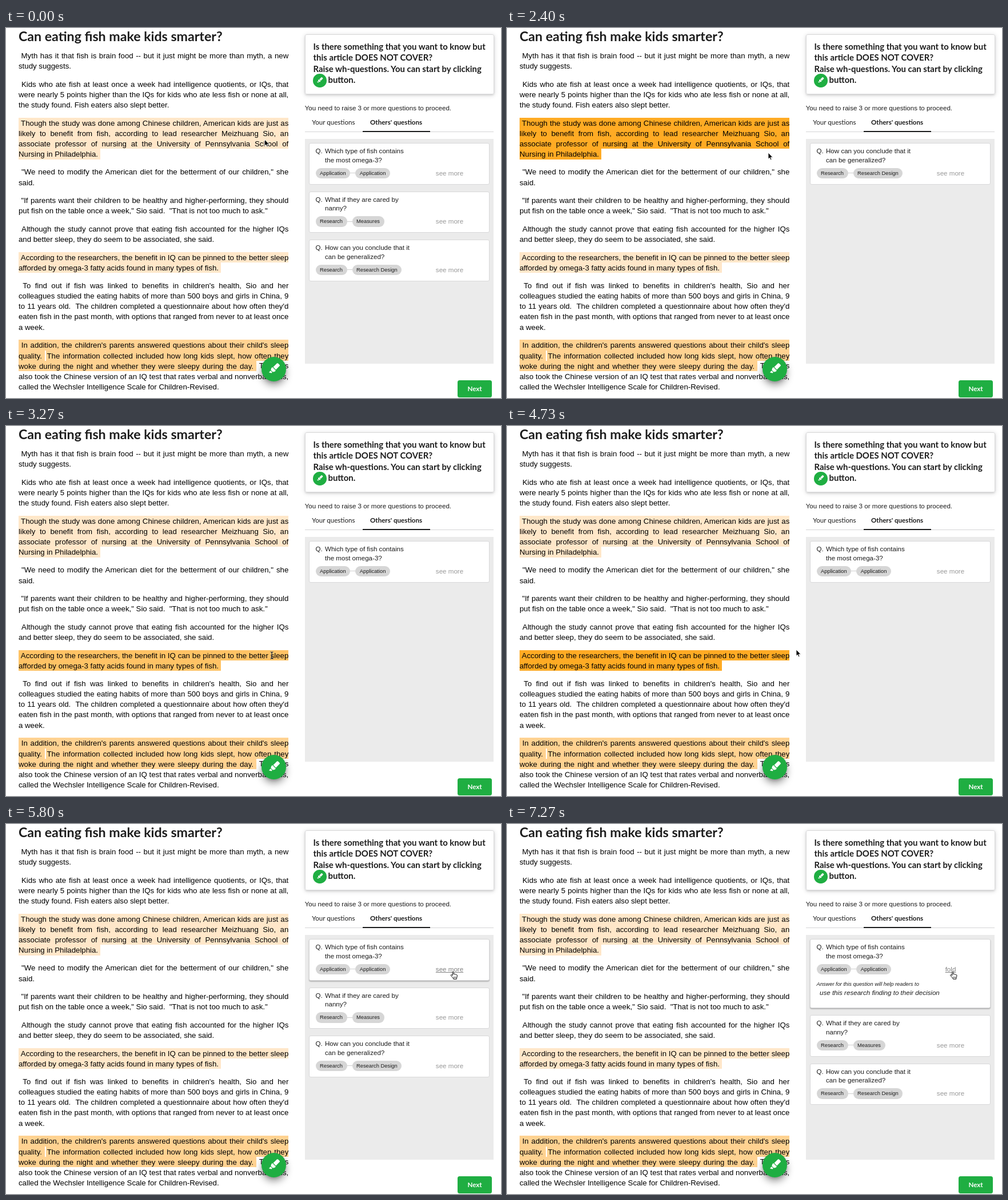
An HTML page that plays this animation: 866 px wide and 647 px high, repeating every 7.47 s.

```html
<!DOCTYPE html>
<html lang="en">
<head>
<meta charset="utf-8">
<title>Reading exercise</title>
<style>
  html, body { margin: 0; width: 100%; height: 100%; overflow: hidden; background: #fff; }
  body { position: relative; font: 11.58px "Liberation Sans", Arial, sans-serif; color: #1c1c1c; }
  body > *, .card > * { position: absolute; box-sizing: border-box; white-space: nowrap; }
  h1 { left: 22px; top: -1px; margin: 0; font: bold 23.17px/30px Lato, sans-serif; }

  #article { left: 22px; top: 40px; width: 472.3px; font-size: 13.24px; line-height: 18.2px; color: #000; }
  #article section { margin-bottom: 13.24px; }
  #article div { height: 18.2px; text-align: justify; text-align-last: justify; }
  #article div:last-child { text-align-last: left; }
  mark { padding: 1.6px 0; color: inherit; background: var(--tint, #ffd291); }
  mark + mark { margin-left: 2px; padding-left: 1.5px; }

  .round { border-radius: 50%; background: #1fae42; }
  .round svg { display: block; width: 100%; height: 100%; fill: #fff; }
  #fab { left: 447px; top: 574.5px; width: 43px; height: 43px; box-shadow: 0 7px 13px rgba(0,0,0,.38), 0 2px 4px rgba(0,0,0,.15); }
  #small { left: 537.3px; top: 80.3px; width: 23.4px; height: 23.4px; }

  #prompt { left: 522.5px; top: 11px; width: 331px; height: 104.5px; padding: 11.3px 14px; border: 1px solid #d9d9da; border-radius: 3px;
    box-shadow: 0 1.6px 3.3px rgba(34,36,38,.14), 0 1.6px 8px rgba(34,36,38,.15); font: bold 14.9px/19.15px Lato, sans-serif; }
  #prompt span { margin-left: 26px; }
  #need { left: 522.7px; top: 133px; line-height: 15px; }
  .tab { top: 156px; font: 11.58px/17px Lato, sans-serif; }
  #rule { left: 522.5px; top: 180.5px; width: 330.5px; height: 1px; background: #d4d4d5; }
  #active { left: 624px; top: 180px; width: 118px; height: 2px; background: #1b1c1d; }
  #panel { left: 522.5px; top: 193.5px; width: 330.5px; height: 393.5px; padding: 7.7px 7px; background: #ebebeb; }
  #next { left: 790px; top: 616px; width: 60px; height: 29.5px; border-radius: 3.5px; background: #1fae42; color: #fff;
    font: bold 11.58px/29.5px Lato, sans-serif; text-align: center; }

  .card { position: relative; box-sizing: border-box; height: 72.4px; margin-bottom: 12.1px; background: #fff; border: 1px solid #d8d8d9; border-radius: 3px; }
  .card.raised { box-shadow: 0 1.5px 2px rgba(0,0,0,.28); }
  .card.open { height: 121px; }
  .letter, .ask { top: 6px; line-height: 15.6px; }
  .letter { left: 11px; }
  .ask { left: 27.5px; }
  .pills { left: 11px; top: 42.5px; display: flex; gap: 9px; }
  .pills span { position: relative; padding: 0 7.5px; border-radius: 9.2px; background: #d6d6d6; font-size: 9.35px; line-height: 18.4px; }
  .pills span + span::before { content: ""; position: absolute; left: -9px; top: 8.7px; width: 9px; height: 1px; background: #d0d0d0; }
  .more { left: 206px; top: 43.5px; width: 79px; text-align: center; line-height: 17px; color: #999; }
  .more.over { color: #808080; text-decoration: underline; }
  .answer { left: 11px; top: 70px; font-style: italic; line-height: 15.3px; display: none; }
  .answer small { font-size: 9.3px; }
  .answer span { margin-left: 5.5px; }
  .open .answer { display: block; }

  #cursor { left: 0; top: 0; width: 1px; height: 1px; overflow: visible; }
</style>
</head>
<body>
<h1>Can eating fish make kids smarter?</h1>
<div id="article"></div>
<div id="fab" class="round"></div>
<div id="prompt">Is there something that you want to know but<br>this article DOES NOT COVER?<br>Raise wh-questions. You can start by clicking<br><span>button.</span></div>
<div id="small" class="round"></div>
<div id="need">You need to raise 3 or more questions to proceed.</div>
<div class="tab" style="left:535.3px">Your questions</div>
<div class="tab" style="left:637px;font-weight:bold">Others' questions</div>
<div id="rule"></div><div id="active"></div>
<div id="panel"></div>
<div id="next">Next</div>
<svg id="cursor">
  <path id="arrow" d="M0 0V11.2L2.5 8.9 4.1 12.7 6 11.9 4.4 8.2H7.9Z" stroke="#fff" stroke-width=".9"/>
  <g id="beam" fill="none">
    <path d="M-2.5-6Q0-6 0-4.5Q0-6 2.5-6M0-4.5V4.5M-2.5 6Q0 6 0 4.5Q0 6 2.5 6M-1.3 1.8H1.3" stroke="#fff" stroke-width="2.2" opacity=".6"/>
    <path d="M-2.5-6Q0-6 0-4.5Q0-6 2.5-6M0-4.5V4.5M-2.5 6Q0 6 0 4.5Q0 6 2.5 6M-1.3 1.8H1.3" stroke="#000" stroke-width="1.1"/>
  </g>
  <g id="hand" stroke="#000" stroke-linejoin="round">
    <path fill="#fff" d="M-2.8-5.6c0-1.5 2-1.5 2 0v3.2c1.4-.6 2-.2 2.2.4 1.2-.4 1.9 0 2 .6 1.4-.3 2 .3 2 1.4 0 2.6-1 3.5-1.2 6.2h-5.2c-.4-2-2.8-3.6-4.6-6.4-.6-1.2 1-1.8 1.9-.8l.9 1z"/>
    <path fill="none" stroke-width=".7" d="M-.6 2V4.5M1.2 2V4.5M3 2V4.5"/>
  </g>
</svg>
<script>
// "~" is a hard space, brackets enclose highlighted text
const ARTICLE = `~Myth has it that fish is brain food -- but it just might be more than myth, a new
study suggests.

~Kids who ate fish at least once a week had intelligence quotients, or IQs, that
were nearly 5 points higher than the IQs for kids who ate less fish or none at all,
the study found. Fish eaters also slept better.

[~Though the study was done among Chinese children, American kids are just as]
[likely to benefit from fish, according to lead researcher Meizhuang Sio, an]
[associate professor of nursing at the University of Pennsylvania School of]
[Nursing in Philadelphia.~]

~"We need to modify the American diet for the betterment of our children," she
said.

~"If parents want their children to be healthy and higher-performing, they should
put fish on the table once a week," Sio said.~ "That is not too much to ask."

~Although the study cannot prove that eating fish accounted for the higher IQs
and better sleep, they do seem to be associated, she said.

[~According to the researchers, the benefit in IQ can be pinned to the better sleep]
[afforded by omega-3 fatty acids found in many types of fish.~]

~To find out if fish was linked to benefits in children's health, Sio and her
colleagues studied the eating habits of more than 500 boys and girls in China, 9
to 11 years old.~ The children completed a questionnaire about how often they'd
eaten fish in the past month, with options that ranged from never to at least once
a week.

[~In addition, the children's parents answered questions about their child's sleep]
[quality.~][The information collected included how long kids slept, how often they]
[woke during the night and whether they were sleepy during the day.~] The kids
also took the Chinese version of an IQ test that rates verbal and nonverbal skills,
called the Wechsler Intelligence Scale for Children-Revised.`;

const CARDS = [
  ["Which type of fish contains<br>the most omega-3?", "Application", "Application"],
  ["What if they are cared by<br>nanny?", "Research", "Measures"],
  ["How can you conclude that it<br>can be generalized?", "Research", "Research Design"]
];

// time, x, y
const PATH = [
  [70, 452.5, 195], [470, 464, 236], [1070, 464, 236], [1330, 452.5, 203], [2200, 452.5, 203],
  [2400, 457, 218], [2600, 463, 236], [2870, 463, 236], [3200, 465, 401], [3300, 465, 401],
  [3470, 464, 406], [3760, 464, 406], [3800, 464, 407], [4200, 464, 407], [4330, 479, 403],
  [4640, 479, 403], [4730, 506, 391], [4790, 506, 391], [5400, 796, 345], [5470, 796, 345],
  [5780, 784, 265], [7000, 784, 265], [7270, 781.5, 265]
];
const LOOP = 7470;
const $ = id => document.getElementById(id);
const between = (t, a, b) => t >= a && t < b;
const clamp = v => Math.min(1, Math.max(0, v));
const easeOut = (t, start, length) => 1 - (1 - clamp((t - start) / length)) ** 2;

const lineHtml = line =>
  `<div>${line.replace(/~/g, "&nbsp;").replace(/\[/g, "<mark>").replace(/]/g, "</mark>")}</div>`;
$("article").innerHTML = ARTICLE.split("\n\n").map(text =>
  `<section>${text.split("\n").map(lineHtml).join("")}</section>`).join("");

$("panel").innerHTML = CARDS.map(([ask, ...pills]) => `<div class="card">
  <div class="letter">Q.</div><div class="ask">${ask}</div>
  <div class="pills">${pills.map(p => `<span>${p}</span>`).join("")}</div>
  <div class="more">see more</div>
  <div class="answer"><small>Answer for this question will help readers to</small><br><span>use this research finding to their decision</span></div>
</div>`).join("");

for (const id of ["fab", "small"]) $(id).innerHTML = `<svg viewBox="-21.5 -21.5 43 43">
  <path transform="translate(1 -1) rotate(45)" d="M-3.3-9.5q0-1.5 1.5-1.5h3.6q1.5 0 1.5 1.5V-.5H-3.3ZM-4.2.7H4.2V3.5L2.4 6.2H-2.4L-4.2 3.5ZM-2 7.3H2V9.2L-2 11.6Z"/></svg>`;

const cards = [...document.querySelectorAll(".card")];
const more = cards[0].querySelector(".more");
const paragraphs = $("article").children;

function cursorAt(t) {
  const next = PATH.findIndex(p => p[0] > t);
  if (next < 1) return (next ? PATH[PATH.length - 1] : PATH[0]).slice(1);
  const [t0, x0, y0] = PATH[next - 1], [t1, x1, y1] = PATH[next];
  const p = (t - t0) / (t1 - t0), k = p * p * (3 - 2 * p);
  return [x0 + (x1 - x0) * k, y0 + (y1 - y0) * k];
}

function tint(paragraph, k) {
  paragraph.style.setProperty("--tint", `rgb(255,${231 - 60 * k},${201 - 165 * k})`);
}

function draw(t) {
  tint(paragraphs[2], easeOut(t, 1400, 270) - easeOut(t, 2430, 170));
  tint(paragraphs[6], easeOut(t, 3170, 270) - easeOut(t, 4800, 200));

  const only = between(t, 1370, 2430) ? 2 : between(t, 3170, 4800) ? 0 : -1;
  const raised = t >= 5600 ? 0 : t >= 5270 ? 1 : -1;
  const open = t >= 6070, overLink = t >= 5660;
  cards.forEach((card, i) => {
    card.style.display = only < 0 || only === i ? "" : "none";
    card.classList.toggle("raised", i === raised);
  });
  cards[0].classList.toggle("open", open);
  more.textContent = open ? "fold" : "see more";
  more.classList.toggle("over", overLink);

  const shape = overLink ? "hand" : between(t, 1270, 2300) || between(t, 3130, 4670) ? "beam" : "arrow";
  for (const id of ["arrow", "beam", "hand"]) $(id).style.display = id === shape ? "" : "none";
  const [x, y] = cursorAt(t);
  $("cursor").style.transform = `translate(${x}px,${y}px)`;
}

function frame() {
  draw(performance.now() % LOOP);
  requestAnimationFrame(frame);
}
frame();
</script>
</body>
</html>
```
